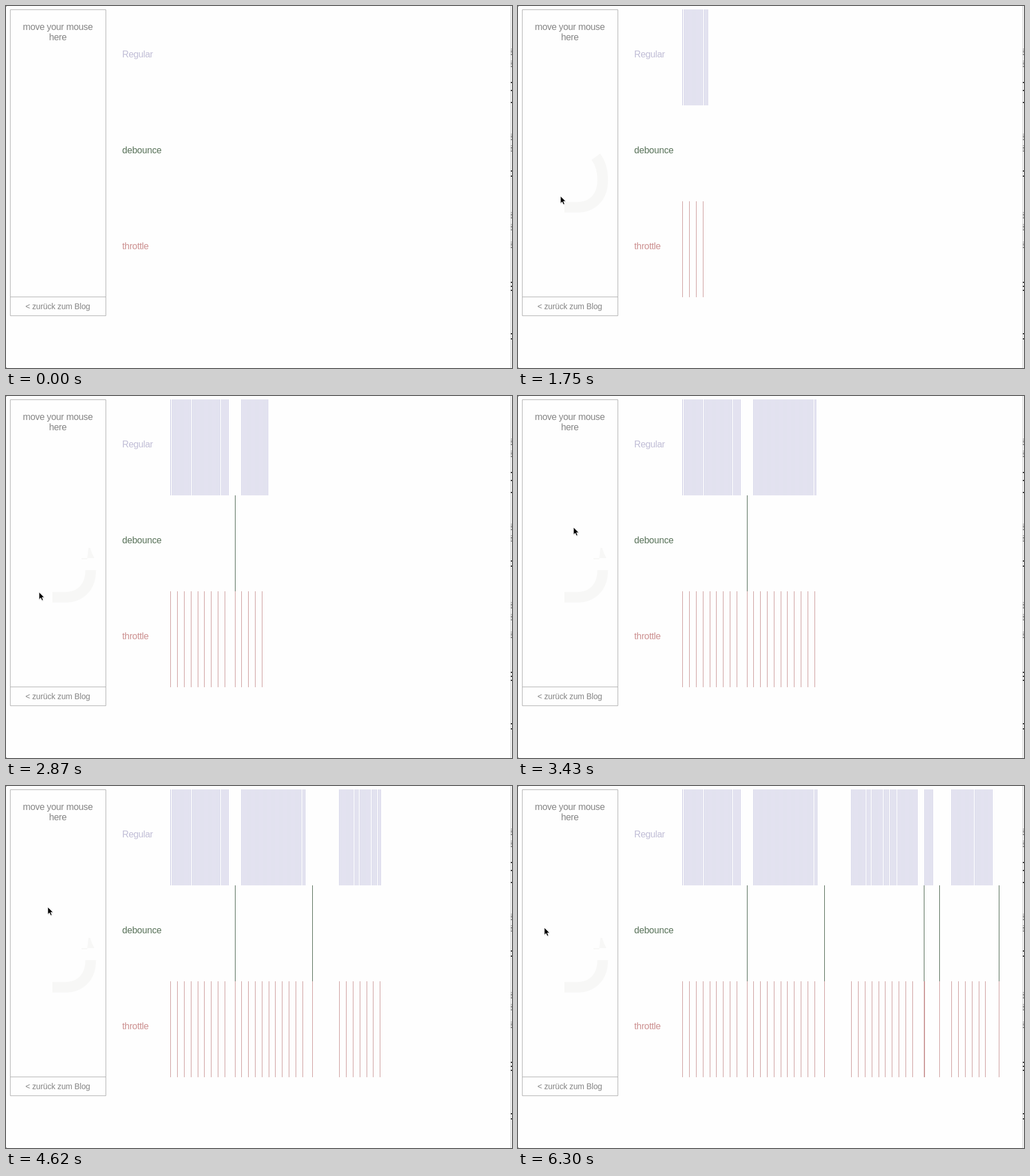
These frames come from a looping animation (884x634 px, 6.79 s). An HTML page:

```html
<!DOCTYPE html>
<html lang="en">
<head>
<meta charset="utf-8">
<title>Regular, debounce, throttle</title>
<style>
  html, body { margin: 0; width: 100%; height: 100%; overflow: hidden; background: #fefefe; }
  svg { display: block; width: 884px; height: 634px; }
  text { font: 16px "Liberation Sans", Arial, sans-serif; letter-spacing: -.35px; }
  .panel { fill: none; stroke: #b0b0b0; }
  .note { fill: #858585; text-anchor: middle; }
  .back { font-size: 14px; letter-spacing: -.15px; }
  .trail { fill: none; stroke: #f7f7f6; stroke-width: 18.5; }
</style>
</head>
<body>
<svg viewBox="0 0 884 634">
  <defs>
    <clipPath id="clip"><rect id="reveal" x="280" y="0" width="0" height="634"/></clipPath>
  </defs>
  <path class="trail" id="low" pathLength="1" d="M81 352.5H104C130 352 148 335 148 305"/>
  <path class="trail" id="high" pathLength="1" d="M148 305Q148 280 136 264"/>
  <path id="rest" fill="#f7f7f6" d="M132 284H142L144 266H147L150 275L154 283V284H142V286H132Z"/>

  <path class="panel" d="M7.5 6.5H174.5V542.5H7.5ZM7.5 509.5H174.5"/>
  <text class="note" x="90.5" y="42">move your mouse</text>
  <text class="note" x="90.5" y="60">here</text>
  <text class="note back" x="90.5" y="531">&lt; zurück zum Blog</text>
  <text x="203" y="90" fill="#c0bdd6">Regular</text>
  <text x="203" y="258" fill="#587259" style="letter-spacing:-.2px">debounce</text>
  <text x="203" y="426" fill="#cc9090">throttle</text>

  <g id="lines" clip-path="url(#clip)" shape-rendering="crispEdges"></g>
  <g id="edge" shape-rendering="crispEdges">
    <path d="M0 0h1v1h-1zM0 633h1v1h-1z" fill="#555"/>
    <path d="M881 0h1v634h-1z" fill="#d6d6d6"/>
    <path d="M882 0h2v634h-2z" fill="#f2f2f2"/>
  </g>
  <g id="cursor">
    <path d="M.5 1.5V14.2L3.4 11.5L5.4 16.2L7.8 15.2L5.8 10.6H9.8Z" fill="#000" opacity=".12"/>
    <path d="M0 0V12.8L2.9 10L5 14.7L7.2 13.7L5.2 9.2H9.2Z" fill="#000" stroke="#fff" stroke-width=".8"/>
  </g>
</svg>
<script>
const LOOP = 6790, STEP = 70;
const WAIT = 11, THROTTLE = 11.9; // in pixels of the time axis
const $ = id => document.getElementById(id);

let seed = 7;
const random = () => (seed = seed * 16807 % 2147483647) / 2147483647;

function bar(parent, x, y, w, h, fill) {
  const r = document.createElementNS("http://www.w3.org/2000/svg", "rect");
  const attrs = { x, y, width: w, height: h, fill };
  for (const k in attrs) r.setAttribute(k, attrs[k]);
  parent.appendChild(r);
}
const regular = x => bar($("lines"), x, 6, 1, 168, "#c7c6e1");
const debounce = x => bar($("lines"), x, 174, 1, 168, "#4a634d");
const throttle = x => bar($("lines"), x, 342, 1, 168, "#cb9898");

// bursts of mouse events: first and last x
for (const [from, to] of [[287, 389], [411, 524], [582, 698], [710, 725], [757, 829]]) {
  for (let x = from; x < to; x += random() < .06 ? 3 : 2) regular(x);
  for (let x = from + .5; x < to - 3; x += THROTTLE) throttle(Math.floor(x));
  debounce(to + WAIT);
  throttle(to + WAIT);
}

// slivers of text from the neighbouring window
for (const y of [75, 96, 224, 244, 361, 382, 413])
  for (let i = 0; i < 4; i++) bar($("edge"), 882, y + i * 3, 2, 1 + i % 2, "#888");
for (const y of [133, 147, 168, 288, 297, 483, 490, 497, 573, 582])
  bar($("edge"), 882, y, 2, 2, "#222");

// pointer stops: time, x, y, radius of the lap that follows
const stops = [
  [140, 408, 618, 0], [630, 140, 258, 45], [1260, 132, 268, 0], [1330, 132, 268, 50],
  [2240, 176, 276, 60], [3430, 97, 230, 0], [3570, 80, 240, 0], [3920, 80, 240, 23],
  [4620, 73, 212, 21], [5250, 80, 249, 0], [5460, 80, 249, 30], [6160, 46, 248, 0]
];

// straight drift between two stops plus one counter-clockwise lap
function pointer(t) {
  const next = stops.findIndex(s => s[0] > t);
  if (next < 0) return stops[stops.length - 1].slice(1, 3);
  const [t0, x0, y0, r] = stops[next - 1], [t1, x1, y1] = stops[next];
  const u = (t - t0) / (t1 - t0), a = Math.PI / 4, b = a + 2 * Math.PI * u;
  return [
    x0 + (x1 - x0) * u + r * (Math.cos(b) - Math.cos(a)),
    y0 + (y1 - y0) * u - r * (Math.sin(b) - Math.sin(a))
  ];
}

const clamp = v => Math.max(0, Math.min(1, v));
function trail(id, part, on) {
  $(id).style.display = on && part > 0 ? "" : "none";
  $(id).setAttribute("stroke-dasharray", part < 1 ? part + " 2" : "none");
}

function draw(time) {
  const t = Math.floor(time % LOOP / STEP) * STEP;
  const head = t < 1400 ? 280 : Math.ceil(521 + (t - 3430) * 0.1125);
  $("reveal").setAttribute("width", head - 280);

  const [x, y] = pointer(Math.max(t, 140));
  $("cursor").style.display = t < 140 ? "none" : "";
  $("cursor").setAttribute("transform", `translate(${x.toFixed(1)} ${y.toFixed(1)})`);

  trail("low", clamp((t - 840) / 280), true);
  trail("high", clamp((t - 1120) / 140), t < 1960);
  $("rest").style.display = t < 1960 ? "none" : "";
}

const start = performance.now();
function tick() {
  draw(performance.now() - start);
  requestAnimationFrame(tick);
}
tick();
</script>
</body>
</html>
```
